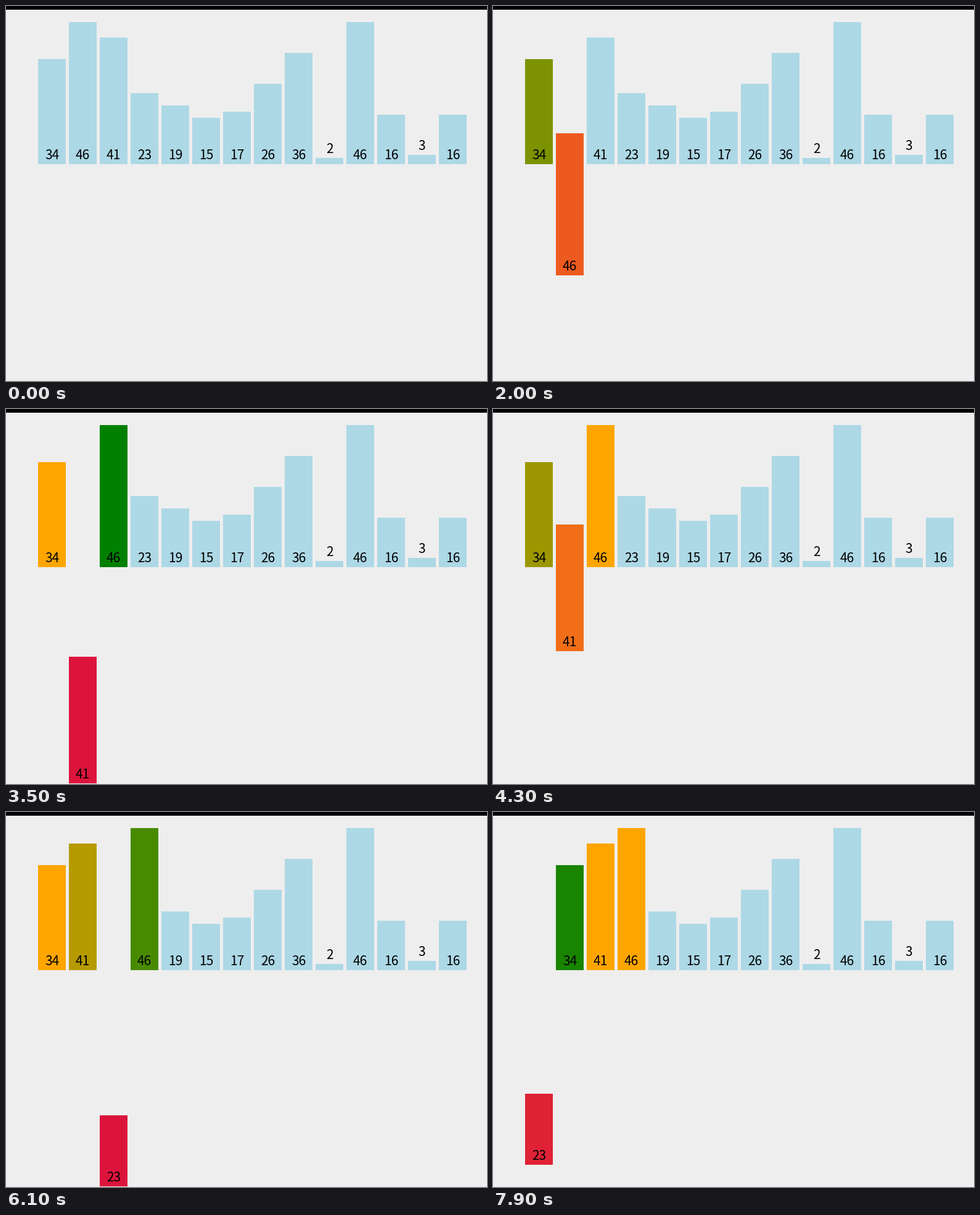
A matplotlib script for the animation above (8 s loop, 780 by 607 pixels).

```python
import matplotlib.pyplot as plt
import numpy as np
from matplotlib.animation import FuncAnimation
from matplotlib.colors import to_rgb
from matplotlib.patches import Rectangle

W, H, DPI = 780, 607, 100
FRAMES, INTERVAL = 80, 100
START, PERIOD, DURATION = 503, 457.75, 250   # ms

VALUES = [34, 46, 41, 23, 19, 15, 17, 26, 36, 2, 46, 16, 3, 16]
LEFT, PITCH, BAR_W, UNIT = 52, 50, 45, 5
BASE, DROP = 256, 350

IDLE = to_rgb("lightblue")
SORTED = to_rgb("orange")
KEY = to_rgb("crimson")
COMPARED = to_rgb("green")


def insertion_steps(values):
    """Poses after each step; a row is (slot, lowered, r, g, b)."""
    pose = np.array([(i, 0, *IDLE) for i in range(len(values))], float)
    order = list(range(len(values)))
    steps = [pose.copy()]

    def save():
        steps.append(pose.copy())

    pose[0, 2:] = SORTED
    save()
    for i in range(1, len(values)):
        key, green = i, None
        pose[key, 1:] = (1, *KEY)
        save()
        for j in range(i - 1, -1, -1):
            other = order[j]
            if green is not None:
                pose[green, 2:] = SORTED
            pose[other, 2:] = COMPARED
            green = other
            save()
            if values[other] <= values[key]:
                break
            order[j], order[j + 1] = key, other
            pose[[key, other], 0] = j, j + 1
            save()
        pose[green, 2:] = SORTED
        pose[key, 1:] = (0, *SORTED)
        save()
    return steps


def ease(t):
    t = min(max(t, 0), 1)
    return 4 * t**3 if t < 0.5 else 1 - 4 * (1 - t)**3


STEPS = insertion_steps(VALUES)

fig = plt.figure(figsize=(W / DPI, H / DPI), dpi=DPI, facecolor="#eeeeee")
ax = fig.add_axes([0, 0, 1, 1])
ax.set(xlim=(0, W), ylim=(H, 0))
ax.axis("off")
ax.add_patch(Rectangle((0, 0), W, 6, color="black", lw=0))

bars, labels = [], []
for v in VALUES:
    bars.append(ax.add_patch(Rectangle((0, 0), BAR_W, UNIT * v, lw=0)))
    labels.append(ax.text(0, 0, str(v), ha="center", va="baseline",
                          family="Noto Sans CJK JP", fontsize=21 * 72 / DPI))


def draw(frame):
    k, rest = divmod(frame * INTERVAL - START, PERIOD)
    k = int(k)
    if k < 0:
        pose = STEPS[0]
    else:
        p = ease(rest / DURATION)
        pose = STEPS[k] + (STEPS[k + 1] - STEPS[k]) * p
    for v, bar, label, (slot, low, *rgb) in zip(VALUES, bars, labels, pose):
        x = LEFT + PITCH * slot
        bottom = BASE + DROP * low
        top = bottom - UNIT * v
        bar.set_xy((x, top))
        bar.set_facecolor(np.clip(rgb, 0, 1))
        label.set_position((x + BAR_W / 2, (top if v < 5 else bottom) - 8))
    return bars + labels


anim = FuncAnimation(fig, draw, frames=FRAMES, interval=INTERVAL,
                     repeat=True, repeat_delay=0, blit=False)
plt.show()
```
